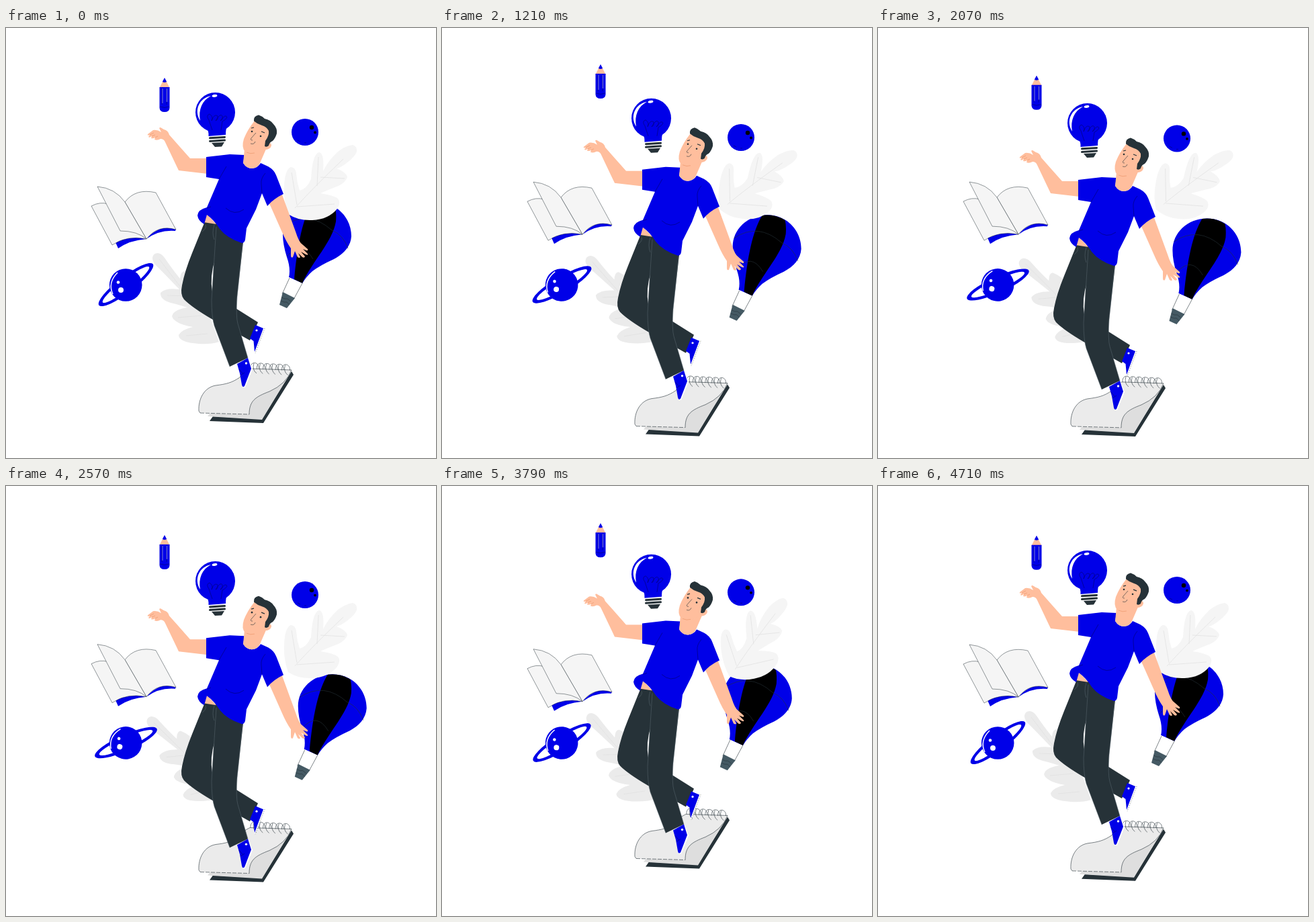
Write an HTML page that moves like this. It is 640 px wide and 640 px high and loops after 4.78 s.

```html
<!DOCTYPE html>
<html lang="en">
<head>
<meta charset="utf-8">
<title>Floating ideas</title>
<style>
html, body { margin: 0; width: 100%; height: 100%; overflow: hidden; background: #fff; }
svg { display: block; width: 100%; height: 100%; }
.blue { fill: #0000e8; }
.dark { fill: #263238; }
.skin { fill: #ffbe9d; }
.page { fill: #f5f5f5; }
.leaf { fill: #ebebeb; }
.white { fill: #fff; }
.line { fill: none; stroke: #263238; stroke-width: .6; }
.sheet { fill: #f5f5f5; stroke: #263238; stroke-width: .5; }
.fold { fill: none; stroke: #00006e; stroke-width: .6; }
.crease { fill: none; stroke: #eb996e; stroke-width: .7; }
.seam { fill: none; stroke: #5c6b72; stroke-width: .5; }
.vein { fill: none; stroke: #e0e0e0; stroke-width: .7; }
</style>
</head>
<body>
<svg viewBox="0 0 640 640">
  <g id="leftLeaf">
    <path class="leaf" d="M218 342Q219 335 226 335Q232 336 236 342Q249 361 259 373Q260 362 266 362Q282 370 290 392Q304 430 317 467Q305 471 287 470Q257 468 257 457Q261 449 278 445Q250 440 247 429Q249 419 270 416Q255 411 245 409Q229 404 230 394Q238 386 258 389Q238 368 222 352Q218 347 218 342Z"/>
    <path class="vein" d="M228 344L290 425M240 398L270 399M256 431L291 428M268 458L300 455"/>
  </g>

  <g id="balloon">
    <path class="blue" d="M421 371Q424 358 418 341Q412 322 412 307C412 281 434 259.500 463 259.500C493 259.500 514 283 514 310C513 325 503 336 488 344Q468 353 456 362Q447 370 441 380Z"/>
    <path d="M456 260C442 283 434 320 429 374L441 380C456 347 486 318 491 288Q492 276 490 267.500Q475 257.500 456 260Z"/>
    <path class="line" d="M414 294Q450 270 485 301Q502 308 509 328M418 340Q440 315 457 344"/>
    <path class="white" d="M421 371L441 380L429 403L412 394Z"/>
    <path class="line" d="M422 372L411 396M441 380L428 404"/>
    <path fill="#455a64" d="M412 393L430 402L418 417L407 412Z"/>
    <path class="line" d="M410 401l5 2 4 0 5 4M409 406l5 2 4 0 4 4"/>
  </g>

  <g id="rightLeaf">
    <path class="page" d="M420 277Q413 258 414 236Q415 210 424 207Q431 207 432 217Q433 230 437 242Q447 240 454 225Q456 187 466 185Q474 186 472 213Q479 198 494 184Q506 175 516 174Q523 176 522 184Q520 191 507 201Q498 208 492 209Q507 215 508 222Q506 229 495 235Q484 239 468 246Q488 249 494 254Q499 260 493 269Q480 285 456 286Q435 287 420 277Z"/>
    <path class="vein" d="M430 268Q455 240 502 195M425 215L433 263M465 192L463 235M504 224L468 222M489 262L433 266"/>
  </g>

  <g id="notepad">
    <path class="dark" d="M308 578L381 582L425 511L428 516L383 588L303 585Z"/>
    <path fill="#dedede" d="M304 573L300 578L381 583L425 510L380 530Z"/>
    <path class="leaf" d="M363 507Q352 512 348 520C336 528 328 530 312 532C295 535 286 552 287 570L289 573L362 575C362 555 371 549 392 541Q417 530 425 509Z"/>
    <path class="line" d="M289 573L287 570C286 552 295 535 312 532C328 530 336 528 348 520Q352 512 363 507L425 509Q417 530 392 541C371 549 362 555 362 575"/>
    <path class="line" stroke-dasharray="6 2" d="M289 573L362 575"/>
    <g id="rings"></g>
  </g>

  <g id="man">
    <path class="dark" d="M296 288L320 292L311 345Q303 370 307 392Q308 396 313 399L375 438L363 465L306 433Q277 416 265 404Q259 397 262 383Q266 362 277 335Z"/>
    <path class="dark" d="M313 289L353 319L344 400Q342 430 345 440L360 491L333 504L310 443Q306 430 306 405Z"/>
    <path class="seam" d="M313 296L306 405Q306 430 310 443L333 504M352 321L344 400Q342 430 345 440L360 491M297 293Q299 298 292 303M310 293Q306 305 310 315"/>

    <path class="white" d="M380 445L385.500 447L371 484L369 482Z"/>
    <path class="blue" d="M371 442L383 447L370 482L368.500 466L363 462Z"/>
    <path class="line" d="M385 447L371 484" stroke-dasharray="1 2"/>
    <circle class="white" cx="373" cy="450" r="1.600"/>
    <path class="white" d="M361 492L367 508L356 535L352 535Z"/>
    <path class="blue" d="M344 500L360 491L365 507L355 533Q352 536 351 531L348 514Z"/>
    <circle class="white" cx="357.500" cy="499" r="1.700"/>
    <path class="fold" d="M347 508l5 6M349 517l6 -4"/>

    <path class="skin" d="M299 277L313 292L294 289Z"/>
    <path class="skin" d="M300 194H274L243 159Q241 152 235 151L230 148Q227 148 229 151L231 155Q225 151 219 152L211 158Q210 161 214 159L212 162Q213 164 217 161L216 164Q219 165 222 163L221 166Q225 168 230 165Q235 165 237 170L257 212L300 217Z"/>
    <path class="crease" d="M214 159l6 -3M217 161l5 -2M222 163l4 -2"/>
    <path class="skin" d="M387 250L408 240L431 303Q436 319 441 322L449 329Q450 332 447 331L442 329L449 336Q450 339 446 337L439 333L445 340Q444 343 441 341L435 335L438 341Q437 343 434 341L430 332L427 341Q424 343 424 338L424 328Q417 318 411 304Z"/>

    <path class="blue" d="M298 192L333 188L355 189L353 201Q358 209 366 209Q375 208 379 201L390 206Q399 211 402 219L413 247Q398 254 389 265L381 246L372 270L358 298L356 315Q355 320 351 320Q329 313 318 299Q310 286 299 278L295 292Q286 287 285 279Q286 270 299 267L317 225L298 222Z"/>
    <path class="fold" d="M328 206L317 225M386 216Q379 224 380 232L381 246M327 268Q340 280 354 270M299 268L305 266"/>

    <path class="skin" d="M355 180L353 201Q358 209 366 209Q375 208 378 201L388 178Z"/>
    <path class="skin" d="M370 138Q359 152 354 165Q350 178 356 184Q370 190 383 181Q393 182 395 175Q395 171 391 170L394 148Z"/>
    <path class="crease" d="M358 185Q364 188 370 186"/>
    <path class="dark" d="M369 138.500Q368 131 376 129.500Q381 131 385 135Q394 137 398 143Q404 149 403 157Q401 164 397 168Q392 170 391 175Q388 178 385 176L386 168Q392 160 391 153Q388 147 381 145Q374 143 369 138.500Z"/>
    <path class="line" d="M372 156L365 164Q363 167 367 167M364 172Q369 174 371 169"/>
    <path class="line" d="M365 149L369 148M380 154L385 156" style="stroke-width:1.200"/>
    <circle class="dark" cx="366" cy="154" r="1.300"/>
    <circle class="dark" cx="379" cy="161" r="1.300"/>
  </g>

  <g id="pencil">
    <path class="skin" d="M233 80H239L243.500 89H228.500Z"/>
    <path class="blue" d="M236 74L239.200 80Q236 82 232.800 80ZM228.500 88H243.500V119Q243 125 236 125Q229 125 228.500 119Z"/>
    <path class="fold" d="M232 90V114M239 90V114M229 117Q236 120 243 117"/>
    <path fill="none" stroke="#fff" stroke-width=".5" d="M233 90V112M239.500 90V110"/>
  </g>

  <g id="bulb">
    <circle class="blue" cx="311.500" cy="125.500" r="29.500"/>
    <path class="blue" d="M297 146H329Q327 151 327 159L301.500 161Q302 152 297 146Z"/>
    <path class="white" d="M305 101C288 104 279 122 289 138C286 121 292 108 305 101Z"/>
    <ellipse class="white" cx="310.500" cy="101" rx="4" ry="1.900" transform="rotate(-8 310.500 101)"/>
    <path class="fold" d="M307 152L302 137Q297 130 303 128Q309 132 306 138Q310 127 315 131Q316 137 312 138Q319 126 322 131Q323 137 319 138Q327 127 329 133Q327 137 322 139L320 152"/>
    <path fill="none" stroke="#263238" stroke-width="3" stroke-linecap="round" d="M303.500 163.800L325.500 162.400M303.500 168.500L325.500 167"/>
    <path class="dark" d="M306 171L325 170L321 176.500L311 177Z"/>
  </g>

  <g id="ball">
    <circle class="blue" cx="445" cy="155" r="20"/>
    <circle cx="455" cy="148" r="3.200"/>
    <circle cx="460" cy="155.500" r="1.900"/>
    <path class="fold" d="M434 167l4 2M444 171h3"/>
  </g>

  <g id="book">
    <path class="blue" d="M163 319L167 328Q184 316 209 314Q184 306 163 319ZM209 314Q228 300 252 302L253 299Q228 292 209 314Z"/>
    <path class="sheet" d="M127 265Q140 258 152 262L209 314Q180 308 158 323Z"/>
    <path class="sheet" d="M177 259Q193 238 223 245L253 300Q226 292 209 314Z"/>
    <path class="sheet" d="M136 236Q162 238 177 259L209 314Q195 302 170 302Z"/>
  </g>

  <g id="planet">
    <g transform="rotate(-37.400 178.500 382)">
      <ellipse class="blue" cx="178.500" cy="382" rx="50.500" ry="12"/>
      <ellipse class="white" cx="178.500" cy="382" rx="43.500" ry="7.500"/>
    </g>
    <circle class="blue" cx="178.200" cy="382.500" r="24.300"/>
    <path fill="none" stroke="#fff" stroke-width="1.500" d="M166 364Q151 379 159 396"/>
    <circle class="white" cx="171" cy="390" r="4"/>
    <circle class="white" cx="167" cy="378.500" r="2.300"/>
  </g>
</svg>
<script>
const LOOP = 4780, STEPS = 67;
const part = id => document.getElementById(id);

part('rings').innerHTML = Array.from({ length: 6 }, (_, i) => {
  const x = 364 + i * 9.3, y = 507 + i * .5;
  return `<path class="line" d="M${x} ${y}C${x - 1} ${y - 12} ${x + 13} ${y - 11} ${x + 12} ${y}M${x + 5} ${y - 8}Q${x + 2} ${y + 2} ${x + 9} ${y + 7}"/>`;
}).join('');

const ease = p => .5 - .5 * Math.cos(Math.PI * p);

// Eased track through [time, value] keys.
function track(t, keys) {
  const i = keys.findIndex(k => k[0] > t);
  const [t0, v0] = keys[i - 1], [t1, v1] = keys[i];
  return v0 + (v1 - v0) * ease((t - t0) / (t1 - t0));
}

const there = (t, peak) => track(t, [[0, 0], [peak, 1], [LOOP, 0]]);
const swing = (t, first, second) => track(t, [[0, 0], [1720, first], [3430, second], [LOOP, 0]]);
const move = (id, x, y) => part(id).setAttribute('transform', `translate(${x} ${y})`);
const turn = (id, angle, x, y) => part(id).setAttribute('transform', `rotate(${angle} ${x} ${y})`);

function draw(t) {
  const rise = there(t, 2320), slow = there(t, LOOP / 2), drift = there(t, 1790);
  move('man', 0, 35 * rise);
  move('bulb', 0, 16.5 * rise);
  move('pencil', 0, -20 * ease(4 * t / LOOP));
  move('ball', 0, swing(t, 10, 4));
  move('notepad', 0, swing(t, 24.5, -22));
  move('book', 0, swing(t, -8.5, 8));
  move('balloon', 27 * drift, 24.5 * drift);
  turn('rightLeaf', swing(t, 10.5, -10.5), 465, 230);
  turn('leftLeaf', -7.8 * slow, 281, 410);
  turn('planet', 13.5 * slow, 178.5, 382);
}

function tick() {
  const step = Math.floor(performance.now() % LOOP / LOOP * STEPS + .1);
  draw(step % STEPS * LOOP / STEPS);
  requestAnimationFrame(tick);
}
tick();
</script>
</body>
</html>
```
